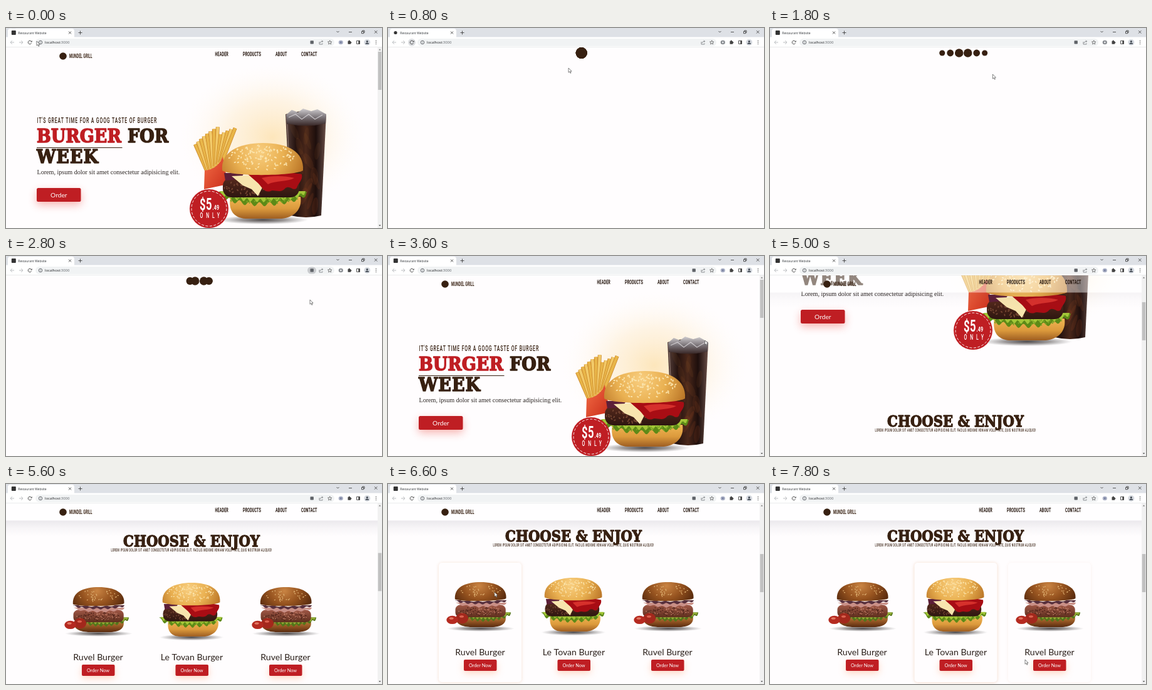
Recreate the animation shown at these times as an HTML page with a canvas. Size 600 by 320 pixels, loop 8 s.

```html
<!DOCTYPE html>
<html lang="en">
<head>
<meta charset="utf-8">
<title>Restaurant Website</title>
<style>
html, body { margin: 0; width: 100%; height: 100%; overflow: hidden; background: #fff; }
canvas { display: block; width: 600px; height: 320px; }
</style>
</head>
<body>
<canvas id="stage"></canvas>
<script>
const canvas = document.getElementById('stage');
const ctx = canvas.getContext('2d');
const ratio = window.devicePixelRatio || 1;
canvas.width = 600 * ratio;
canvas.height = 320 * ratio;

const LOOP = 8000, STEP = 200;
const BROWN = '#372011', RED = '#bf1e23', PAPER = '#fffdfe', GREY = '#5f6368';
const SANS = '"Open Sans", sans-serif', LATO = 'Lato, sans-serif';
const SLAB = '"DejaVu Serif", serif', POSTER = 'Roboto, sans-serif';
const NARROW = 0.58, SLAB_WIDTH = 0.9;

const scrollKeys = [[4600, 0], [4800, 55], [5000, 170], [5200, 252], [5400, 310], [5600, 343], [5800, 351]];
const cursorKeys = [
  [0, 49, 21], [200, 38, 21], [400, 40, 22], [600, 170, 48], [800, 288, 64], [1400, 306, 72],
  [2000, 380, 75], [2600, 485, 70], [3400, 485, 70], [4200, 568, 330], [6000, 300, -20],
  [6200, 262, 21], [6400, 190, 120], [6800, 150, 226], [7200, 285, 226], [7400, 300, 256],
  [7600, 345, 288], [7800, 407, 281]
];
const cards = [
  { x: 81, name: 'Ruvel Burger', hover: [6450, 6900], draw: darkBurger },
  { x: 230.5, name: 'Le Tovan Burger', hover: [6950, 7690], draw: seedBurger },
  { x: 380, name: 'Ruvel Burger', hover: [7740, 9000], draw: darkBurger }
];

const clamp = v => Math.max(0, Math.min(1, v));
const ramp = (t, a, b) => clamp((t - a) / (b - a));

function track(keys, t) {
  if (t <= keys[0][0]) return keys[0].slice(1);
  for (let i = 1; i < keys.length; i++) {
    const a = keys[i - 1], b = keys[i];
    if (t <= b[0]) {
      const p = ramp(t, a[0], b[0]);
      return a.slice(1).map((v, j) => v + (b[j + 1] - v) * p);
    }
  }
  return keys[keys.length - 1].slice(1);
}

function random(seed) {
  return () => (seed = (seed * 16807) % 2147483647) / 2147483647;
}

// The CSS "ease" curve, solved for x by bisection.
function ease(x) {
  const bez = (u, a, b) => 3 * u * (1 - u) ** 2 * a + 3 * u * u * (1 - u) * b + u ** 3;
  let lo = 0, hi = 1;
  for (let i = 0; i < 20; i++) {
    const mid = (lo + hi) / 2;
    if (bez(mid, 0.25, 0.25) < x) lo = mid; else hi = mid;
  }
  return bez(lo, 0.1, 1);
}

function text(s, x, y, font, color, { k = 1, gap = 0, align = 'left', bold = 0 } = {}) {
  ctx.save();
  ctx.translate(x, y);
  ctx.scale(k, 1);
  ctx.font = font;
  ctx.textAlign = align;
  ctx.letterSpacing = gap / k + 'px';
  ctx.fillStyle = ctx.strokeStyle = color;
  ctx.fillText(s, 0, 0);
  if (bold) {
    ctx.lineWidth = bold;
    ctx.lineJoin = 'round';
    ctx.strokeText(s, 0, 0);
  }
  ctx.restore();
}

function rect(x, y, w, h, color, r = 0) {
  ctx.fillStyle = color;
  ctx.beginPath();
  ctx.roundRect(x, y, w, h, r);
  ctx.fill();
}

function oval(x, y, rx, ry, color, turn = 0) {
  ctx.fillStyle = color;
  ctx.beginPath();
  ctx.ellipse(x, y, rx, ry, turn, 0, 7);
  ctx.fill();
}

function shape(d, color) {
  ctx.fillStyle = color;
  ctx.fill(new Path2D(d));
}

function line(d, color = GREY, width = 0.9) {
  ctx.strokeStyle = color;
  ctx.lineWidth = width;
  ctx.stroke(new Path2D(d));
}

function fade(x0, y0, x1, y1, ...colors) {
  const g = ctx.createLinearGradient(x0, y0, x1, y1);
  colors.forEach((c, i) => g.addColorStop(i / (colors.length - 1), c));
  return g;
}

function glow(x, y, r, ...colors) {
  const g = ctx.createRadialGradient(x, y, 0, x, y, r);
  colors.forEach((c, i) => g.addColorStop(i / (colors.length - 1), c));
  return g;
}

function withShadow(color, blur, dy, draw) {
  ctx.save();
  ctx.shadowColor = color;
  ctx.shadowBlur = blur * ratio;
  ctx.shadowOffsetY = dy * ratio;
  draw();
  ctx.restore();
}

function at(x, y, scale, draw) {
  ctx.save();
  ctx.translate(x, y);
  ctx.scale(scale, scale);
  draw();
  ctx.restore();
}

// A frilled layer, tapering to both ends.
function wavy(x0, x1, y, h, amp, waves, color) {
  ctx.fillStyle = color;
  ctx.beginPath();
  ctx.moveTo(x0, y);
  ctx.lineTo(x1, y);
  for (let i = 0; i <= 60; i++) {
    const p = i / 60;
    const bulge = h * Math.sqrt(Math.max(0, Math.sin(p * Math.PI)));
    ctx.lineTo(x1 + (x0 - x1) * p, y + bulge + amp * Math.sin(p * waves * 6.283));
  }
  ctx.fill();
}

function groundShadow(y, rx) {
  ctx.save();
  ctx.translate(0, y);
  ctx.scale(1, 0.1);
  oval(0, 0, rx, rx, glow(0, 0, rx, 'rgba(30,25,25,.8)', 'rgba(60,55,55,.5)', 'rgba(90,90,90,0)'));
  ctx.restore();
}

function seeds(count, seed, cx, cy, rx, ry, color) {
  const rnd = random(seed);
  for (let i = 0; i < count; i++) {
    const a = rnd() * 6.283, d = Math.sqrt(rnd());
    oval(cx + Math.cos(a) * d * rx, cy + Math.sin(a) * d * ry, 1.8, 1, color, rnd() * 3);
  }
}

// Burgers hang from the middle of the top of the bun.
function seedBurger() {
  groundShadow(123, 72);
  shape('M-52 86H60C63 106 50 119 30 121H-28C-46 120-56 108-52 86Z', fade(0, 88, 0, 122, '#eeb352', '#dc9a3c', '#9a5a20'));
  wavy(-73, 70, 78, 20, 3.5, 9, '#5d8a17');
  wavy(-71, 68, 77, 15, 3, 13, '#a3c638');
  seeds(40, 41, 0, 90, 58, 7, '#7ba325');
  rect(-64, 55, 122, 32, fade(0, 57, 0, 88, '#55291c', '#2c1510'), 14);
  seeds(55, 31, -20, 71, 42, 13, '#754632');
  shape('M-62 48L-30 48-36 58-60 60Z', '#5c1f38');
  shape('M-50 53L10 50 -8 85-18 74-32 68Z', '#f7e5ae');
  shape('M-24 50C0 46 45 46 62 50C64 60 56 64 54 72C48 78 44 67 36 72C28 82 18 73 12 77C2 80-2 70-8 64Z', '#a80d14');
  shape('M-2 56C12 52 35 52 50 56C40 62 20 60 8 66Z', '#d6302c');
  shape('M-65 44C-68 14-38 0 0 0C40 0 66 14 64 44C50 53-50 54-65 44Z', glow(-6, 14, 76, '#f8ce80', '#eab152', '#b97426'));
  seeds(110, 77, 0, 23, 54, 20, '#fbe3aa');
}

function darkBurger() {
  ctx.save();
  ctx.translate(0, 10);
  ctx.scale(1, 0.85);
  groundShadow(123, 76);
  shape('M-56 92H56C58 110 46 118 28 119H-24C-46 118-58 108-56 92Z', fade(0, 92, 0, 120, '#b87836', '#8d5021', '#55290f'));
  wavy(-52, 68, 80, 22, 3, 10, '#52751a');
  wavy(-50, 66, 80, 16, 3, 13, '#93ad35');
  rect(-57, 60, 113, 33, fade(0, 62, 0, 92, '#9c5544', '#60301f'), 12);
  seeds(50, 19, 0, 77, 50, 12, '#c07e68');
  seeds(50, 23, 0, 77, 50, 12, '#4c2219');
  wavy(-56, 58, 54, 11, 2, 6, '#c98f86');
  wavy(-58, 58, 48, 9, 2, 7, '#57303d');
  wavy(-57, 56, 44, 7, 1.5, 5, '#e6d2c6');
  shape('M-58 45C-60 13-34 0 0 0C36 0 59 15 57 43C46 51-46 52-58 45Z', glow(-4, 10, 68, '#c98443', '#96531f', '#56290d'));
  seeds(38, 53, 0, 22, 44, 17, '#dfb173');
  oval(-42, 96, 14, 14, '#a3281c');
  oval(-64, 100, 13, 11, '#b52a20');
  oval(-66, 96, 5, 3, '#e27863');
  oval(-43, 91, 5, 3, '#dc6350');
  ctx.restore();
}

function drink() {
  shape('M446 138Q479 128 511 138L503 300Q479 306 454 300Z', fade(446, 0, 511, 0, '#59423c', '#24120f', '#49271a', '#1d0e0c', '#6b5048'));
  const rnd = random(12);
  for (let i = 0; i < 16; i++) {
    const x = 460 + rnd() * 38, y = 165 + i * 8;
    oval(x, y, 3 + rnd() * 3, 14, `rgba(${120 + i * 3},76,36,.16)`, rnd() - 0.5);
  }
  shape('M447 139L456 131 466 135 474 129 487 133 497 130 511 138 510 153Q479 160 448 153Z', fade(0, 130, 0, 157, '#c9c6c9', '#777074', '#352322'));
  line('M451 143L462 138 472 146 483 138 493 146 505 139', 'rgba(232,230,232,.7)', 1.2);
  line('M449 154L456 298', 'rgba(225,205,195,.4)', 1.2);
}

function fries() {
  for (let i = 0; i < 13; i++) {
    const a = -1.98 + i * 0.065;
    const len = 48 + (i * 17) % 15;
    const x = 321 + i * 2, y = 230 - i * 1.4;
    const d = `M${x} ${y}L${x + Math.cos(a) * len} ${y + Math.sin(a) * len}`;
    line(d, '#c98328', 6);
    line(d, i % 2 ? '#f2ca69' : '#e9b649', 4.5);
  }
  shape('M317 228Q338 226 346 206L354 250 316 258Z', fade(316, 220, 352, 245, '#ee6540', '#cf3520'));
}

function badge() {
  oval(324, 289, 31, 31, RED);
  ctx.setLineDash([4, 2.5]);
  ctx.strokeStyle = '#fff';
  ctx.lineWidth = 0.9;
  ctx.beginPath();
  ctx.arc(324, 289, 28, 0, 7);
  ctx.stroke();
  ctx.setLineDash([]);
  text('$5', 309, 291, '700 26px ' + POSTER, '#fff', { k: 0.64, gap: 0.5 });
  text('.49', 329.5, 291, '700 11.5px ' + POSTER, '#fff', { k: 0.64, gap: 0.1 });
  text('ONLY', 309.5, 304, '500 12px ' + POSTER, '#fff', { k: NARROW, gap: 4.9 });
}

function hero() {
  ctx.save();
  ctx.translate(425, 175);
  ctx.scale(1.25, 1);
  oval(0, 0, 118, 118, glow(0, 0, 118, 'rgba(252,222,165,.75)', 'rgba(253,232,195,.45)', 'rgba(255,250,242,0)'));
  ctx.restore();
  fries();
  drink();
  at(410, 184, 1, seedBurger);
  badge();
  text("IT'S GREAT TIME FOR A GOOG TASTE OF BURGER", 49.5, 151.5, '500 12px ' + POSTER, BROWN, { k: NARROW, gap: 0.86 });
  const slab = '700 30px ' + SLAB, style = { k: SLAB_WIDTH, bold: 1.6 };
  text('BURGER', 49, 182.5, slab, RED, style);
  text('FOR', 194, 182.5, slab, BROWN, style);
  text('WEEK', 49, 216, slab, BROWN, { ...style, gap: 1 });
  rect(49, 191, 136.5, 1, BROWN);
  text('Lorem, ipsum dolor sit amet consectetur adipisicing elit.', 49.5, 234, '10.1px "Liberation Serif", serif', '#2b2522');
  withShadow('rgba(235,70,60,.4)', 14, 5, () => rect(49, 256, 70.5, 22, RED, 2.5));
  text('Order', 84.3, 270.5, '10.2px ' + LATO, '#fff', { align: 'center' });
}

function card({ x, name, hover, draw }, t) {
  const lift = ramp(t, hover[0], hover[0] + 300) - ramp(t, hover[1], hover[1] + 300);
  const mid = x + 66;
  if (lift > 0) withShadow(`rgba(225,165,120,${0.65 * lift})`, 5, 0.5, () => rect(x, 477, 132, 191, PAPER, 5));
  at(mid - (draw === seedBurger ? 0.5 : -1), 501, 0.71, draw);
  text(name, mid, 625, '14.1px ' + LATO, '#2c211c', { align: 'center' });
  withShadow('rgba(255,150,95,.35)', 12, 4, () => rect(mid - 26, 632, 52.5, 18, RED, 2));
  text('Order Now', mid, 643.5, '7.3px ' + LATO, '#fff', { align: 'center' });
}

function header(scroll, t) {
  const solid = scroll > 0 ? ramp(t, 4780, 5260) : 0;
  if (solid) {
    rect(0, 31, 593, 27.5, `rgba(255,254,255,${solid})`);
    rect(0, 58.5, 593, 26, fade(0, 58.5, 0, 84, `rgba(60,55,85,${0.1 * solid})`, `rgba(60,55,85,${0.035 * solid})`, 'rgba(60,55,85,0)'));
  }
  oval(91, 45, 5.8, 5.8, BROWN);
  text('MUNDEL GRILL', 101, 48, '700 8.5px ' + POSTER, BROWN, { k: 0.6, gap: 0.1 });
  [['HEADER', 333.5], ['PRODUCTS', 378], ['ABOUT', 430], ['CONTACT', 471]].forEach(([s, x]) =>
    text(s, x, 45, '600 9.8px ' + POSTER, '#22130b', { k: 0.56, gap: 0.1 }));
}

function page(t) {
  const [scroll] = track(scrollKeys, t);
  ctx.save();
  ctx.beginPath();
  ctx.rect(0, 31, 593, 289);
  ctx.clip();
  ctx.save();
  ctx.translate(0, -scroll);
  hero();
  text('CHOOSE & ENJOY', 296, 443, '700 23.5px ' + SLAB, BROWN, { k: SLAB_WIDTH, align: 'center', bold: 1.3 });
  text('LOREM IPSUM DOLOR SIT AMET CONSECTETUR ADIPISICING ELIT. FACILIS MEXIME VENIAM VOLUPTATE, QUIS NOSTRUM ALIQUID!',
    296, 451, '500 6.3px ' + POSTER, BROWN, { k: NARROW, gap: 0.35, align: 'center' });
  cards.forEach(c => card(c, t));
  ctx.restore();
  header(scroll, t);
  ctx.restore();
  rect(593, 31, 7, 289, '#f1f1f1');
  rect(593.7, 38 + scroll * 0.211, 5.6, 61, '#c1c1c1');
  shape('M594.8 35.5L596.5 33.5 598.2 35.5Z', '#777');
  shape('M594.8 315L596.5 317 598.2 315Z', '#555');
}

// Six dots that spread from the centre and snap back together.
function loader(t) {
  const REM = 7, p = ((t - 800 + 1500) % 1500) / 1500;
  const stops = [0, 0.25, 0.5, 0.75, 0.95, 1];
  const offsets = [[0, 1, 3, 5, 0, 0], [0, 1, 3, 3, 0, 0], [0, 1, 1, 1, 0, 0]];
  const size = { 0: 1, 1: 0.75, 3: 0.6, 5: 0.5 };
  let i = 0;
  while (i < 4 && p >= stops[i + 1]) i++;
  const e = ease(ramp(p, stops[i], stops[i + 1]));
  for (const row of offsets) {
    const a = row[i], b = row[i + 1];
    const dx = (a + (b - a) * e) * REM;
    const r = 9 * (size[a] + (size[b] - size[a]) * e);
    oval(308.7 - dx, 40, r, r, BROWN);
    oval(308.7 + dx, 40, r, r, BROWN);
  }
}

function ring(x, y, r, color = GREY, from = 0, to = 7) {
  ctx.strokeStyle = color;
  ctx.lineWidth = 0.9;
  ctx.beginPath();
  ctx.arc(x, y, r, from, to);
  ctx.stroke();
}

function browser(t) {
  rect(0, 0, 600, 15, '#dee1e6');
  rect(3, 1, 106, 15, '#fff', [4, 4, 0, 0]);
  rect(0, 14.5, 600, 16, '#fff');
  rect(0, 30, 600, 0.8, '#e3e4e6');
  rect(47, 17, 477, 12, '#f1f3f4', 6);
  if (t >= 600 && t < 1800) oval(12, 7.5, 2.6, 2.6, '#333');
  else rect(8.8, 4, 7, 7, '#333', 1);
  text('Restaurant Website', 19.3, 9.5, '5px ' + SANS, '#303438');
  line('M100 5.5l4 4m0-4l-4 4M118.5 4.5v6m-3-3h6', '#444');
  line('M527.5 5l2 2 2-2M547 6.5h5M588 4.2l4.4 4.4m0-4.4l-4.4 4.4', '#333', 0.8);
  line('M567.5 5.5h3.2v3.2h-3.2zM568.7 5.3v-1.2h3.3v3.3h-1.2', '#333', 0.8);

  line('M13 23H7m2.8-2.8L7 23l2.8 2.8M21 23h6m-2.8-2.8L27 23l-2.8 2.8', '#b4b7ba');
  if (t >= 200 && t < 1400) oval(38, 23, 6, 6, '#dcdee1');
  ring(38, 23, 2.8, '#444', 0.4, 5.6);
  shape('M39 22.6h2.6v-2.7z', '#444');
  ring(55, 23, 2.8);
  line('M55 22.7v1.8M55 21v.8', GREY, 0.8);
  text('localhost', 62, 25, '5.9px ' + SANS, '#202124');
  text(':3000', 86.3, 25, '5.9px ' + SANS, GREY);

  if (t < 600 || t >= 1800) {
    if (t >= 2400 && t < 3600) rect(481, 17.5, 14, 11, '#c9cbce', 5.5);
    rect(485.5, 20.2, 5.4, 5.4, GREY, 0.8);
  }
  line('M500 22v4h5v-1.5M501.5 24c0-2 1.5-2.7 4-2.7m-1.5-1.6l1.6 1.6-1.6 1.6', GREY, 0.7);
  line('M516.7 19.8l.9 2.1 2.3.2-1.7 1.5.5 2.3-2-1.2-2 1.2.5-2.3-1.7-1.5 2.3-.2z', '#444', 0.7);
  const idle = t >= 600 && t < 3600;
  oval(534.3, 23, 3.6, 3.2, idle ? '#878b90' : '#a9afc4');
  oval(534.3, 23, 1.4, 1.4, idle ? '#e3e4e6' : '#727b9c');
  rect(545.5, 21, 4.7, 4.8, '#444', 0.6);
  oval(547.7, 20.7, 1.1, 1.1, '#444');
  oval(550.4, 23.3, 1.1, 1.1, '#444');
  line('M559.5 20.4h5v5h-5z', '#444', 0.9);
  rect(562.3, 20.2, 2.4, 5.4, '#444');
  oval(576.3, 23, 5, 5, '#d5d9df');
  oval(576.3, 21.6, 1.5, 1.5, '#3f4650');
  shape('M573.5 25.8q0-2.2 2.8-2.2t2.8 2.2z', '#3f4650');
  [20.4, 23, 25.6].forEach(y => oval(590.5, y, 0.65, 0.65, '#444'));
}

function cursor(t) {
  if (t > 4200 && t < 6200) return;
  const [x, y] = track(cursorKeys, t);
  at(x, y, 1, () => {
    const arrow = 'M0 0V7.2L1.7 5.7 2.9 8.3 4.1 7.8 2.9 5.2H5.1Z';
    shape(arrow, '#fff');
    line(arrow, '#333', 0.6);
  });
}

function frame(now) {
  const t = Math.floor((now % LOOP) / STEP) * STEP;
  ctx.setTransform(ratio, 0, 0, ratio, 0, 0);
  rect(0, 0, 600, 320, PAPER);
  if (t < 600 || t >= 3000) page(t);
  else if (t >= 800) loader(t);
  browser(t);
  cursor(t);
  requestAnimationFrame(frame);
}
requestAnimationFrame(frame);
</script>
</body>
</html>
```
